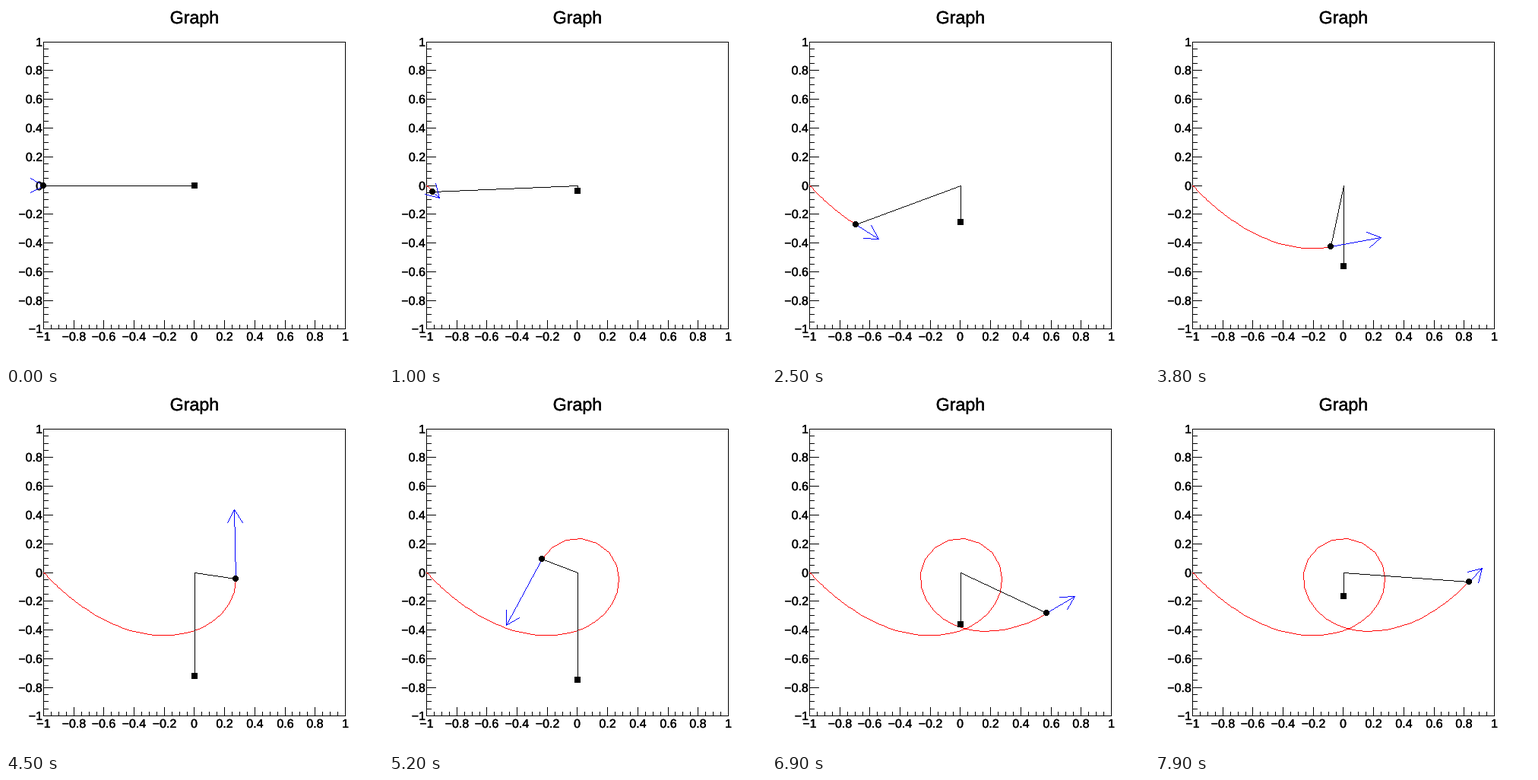
Animation, 496 px wide and 472 px high, one loop 8000 ms. Source, as a matplotlib script:

```python
"""Swinging Atwood machine: a pendulum bob pulled in by a counterweight."""
import numpy as np
import matplotlib.pyplot as plt
from matplotlib import patheffects
from matplotlib.animation import FuncAnimation
from matplotlib.patches import Circle, Rectangle

W, H, DPI = 496, 472, 100
PX = 72 / DPI                 # one pixel in points
FRAMES, INTERVAL = 80, 100
G, RATIO = 9.81, 8.0          # gravity, counterweight mass / bob mass
STEP, PER_FRAME = 0.001, 10   # integration step, steps per frame
ARROW = 0.05                  # arrow length per unit of speed
BARB, BARB_HALF = 17.0, 9.8   # arrow head in pixels

plt.rcParams["path.simplify"] = False


def to_px(x, y):
    """Data coordinates to unrounded pixels."""
    return W / 2 + 0.4 * W * x, H / 2 - 0.4 * H * y


def rates(s):
    r, phi, vr, om = s
    return np.array([
        vr,
        om,
        (r * om**2 + G * (np.cos(phi) - RATIO)) / (1 + RATIO),
        -(2 * vr * om + G * np.sin(phi)) / r,
    ])


def simulate():
    s = np.array([1.0, -np.pi / 2, 0.0, 0.0])
    states = [s]
    for _ in range(FRAMES * PER_FRAME):
        k1 = rates(s)
        k2 = rates(s + STEP / 2 * k1)
        k3 = rates(s + STEP / 2 * k2)
        k4 = rates(s + STEP * k3)
        s = s + STEP / 6 * (k1 + 2 * k2 + 2 * k3 + k4)
        states.append(s)
    # after the start at rest, samples sit half a frame step back
    half = PER_FRAME // 2
    return np.array(states[:1] + states[half::PER_FRAME])[:FRAMES].T


r, phi, vr, om = simulate()
sin, cos = np.sin(phi), np.cos(phi)
bob_x, bob_y = to_px(r * sin, -r * cos)
vel_x = vr * sin + r * om * cos
vel_y = -vr * cos + r * om * sin
weight_y = to_px(0, r - 1)[1]

fig = plt.figure(figsize=(W / DPI, H / DPI), dpi=DPI, facecolor="white")
ax = fig.add_axes([0, 0, 1, 1])
ax.set_xlim(0, W)
ax.set_ylim(H, 0)
ax.axis("off")


def trace(xs, ys):
    """Cover a polyline with single pixels, each a short dash."""
    xs, ys = np.floor(xs), np.floor(ys)
    px, py = [xs[:1]], [ys[:1]]
    for x0, y0, x1, y1 in zip(xs, ys, xs[1:], ys[1:]):
        n = int(max(abs(x1 - x0), abs(y1 - y0)))
        t = np.arange(1, n + 1) / max(n, 1)
        px.append(np.floor(x0 + (x1 - x0) * t + 0.5))
        py.append(np.floor(y0 + (y1 - y0) * t + 0.5))
    px, py = np.concatenate(px), np.concatenate(py)
    gap = np.full_like(px, np.nan)
    return (np.column_stack([px + 0.2, px + 0.8, gap]).ravel(),
            np.column_stack([py + 0.5, py + 0.5, gap]).ravel())


def line(xs, ys, color="black", z=2):
    return ax.plot(*trace(xs, ys), color=color, lw=0.6 * PX, snap=False,
                   antialiased=False, solid_capstyle="butt", zorder=z)[0]


def label(x, y, text, size, ha):
    bolder = patheffects.withStroke(linewidth=0.35 * PX, foreground="black")
    ax.text(x, y, text, fontsize=size * PX, family="Liberation Sans",
            ha=ha, va="baseline", zorder=1, path_effects=[bolder])


def draw_axes():
    left, top = np.floor(to_px(-1, 1))
    right, bottom = np.floor(to_px(1, -1))
    line([left, right, right, left, left], [top, top, bottom, bottom, top])
    for i in range(41):
        v = -1 + i / 20
        x, y = np.floor(to_px(v - 1e-9, v - 1e-9))
        major = i % 4 == 0
        line([x, x], [bottom, bottom - (11 if major else 5)])
        line([left, left + (12 if major else 6)], [y, y])
        if major:
            text = f"{v:.1f}" if i % 20 else f"{v:.0f}"
            text = text.replace("-", "\u2212")
            label(x + 0.5, 440, text, 16, "center")
            label(48, y + 6, text, 16, "right")
    label(W / 2, 23, "Graph", 23.2, "center")


draw_axes()
pivot_x, pivot_y = to_px(0, 0)
start = [pivot_x], [pivot_y]
trail = line(*start, "red", 3)
string = line(*start, "black", 4)
arrow = line(*start, "blue", 5)
bob = ax.add_patch(Circle((0, 0), 3.5, fc="black", ec="none",
                          antialiased=False, zorder=6))
weight = ax.add_patch(Rectangle((0, 0), 8, 8, fc="black", ec="none",
                                antialiased=False, zorder=6))


def update(n):
    bx, by, wy = bob_x[n], bob_y[n], weight_y[n]
    trail.set_data(*trace(bob_x[:n + 1], bob_y[:n + 1]))
    string.set_data(*trace([pivot_x, pivot_x, bx], [wy, pivot_y, by]))
    bob.center = np.floor(bx), np.floor(by)
    weight.set_xy((pivot_x - 4, np.floor(wy) - 4))

    dx = ARROW * 0.4 * W * vel_x[n]
    dy = -ARROW * 0.4 * H * vel_y[n]
    a = np.arctan2(dy, dx) if n else 0.0
    ux, uy = np.cos(a), np.sin(a)
    tx, ty = bx + dx, by + dy
    back_x, back_y = tx - BARB * ux, ty - BARB * uy
    px, py = -BARB_HALF * uy, BARB_HALF * ux
    arrow.set_data(*trace([bx, tx, back_x + px, tx, back_x - px],
                          [by, ty, back_y + py, ty, back_y - py]))
    return trail, string, arrow, bob, weight


anim = FuncAnimation(fig, update, frames=FRAMES, interval=INTERVAL,
                     repeat=True, repeat_delay=0, blit=False)
plt.show()
```
